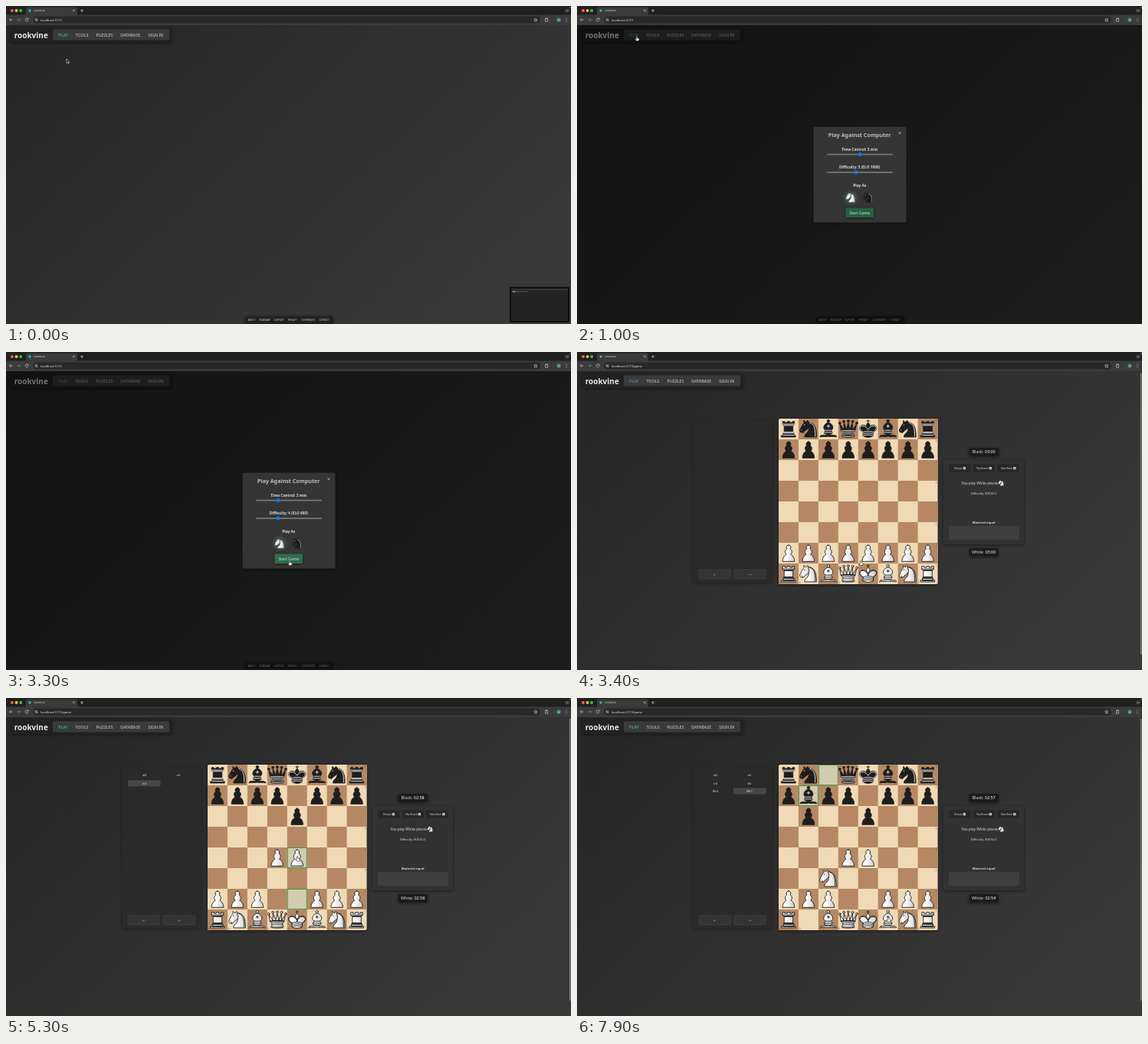
An HTML page that plays this animation: 737 by 415 pixels, repeating every 8 s.

```html
<!DOCTYPE html>
<html lang="en">
<head>
<meta charset="utf-8">
<title>rookvine</title>
<style>
  html, body { margin: 0; width: 100%; height: 100%; overflow: hidden; background: #222; }
  svg { display: block; width: 737px; height: 415px; }
  text { font-family: "Noto Sans", sans-serif; }
  .w { fill: url(#ivory); stroke: #222; --line: #222; }
  .b { fill: #1e1e1e; stroke: #1e1e1e; --line: #e8e8e8; }
  .w, .b { stroke-width: 1.4; stroke-linejoin: round; stroke-linecap: round; }
  .line { fill: none; stroke: var(--line); }
  .icon { fill: none; stroke: #c8c8c8; stroke-width: .7; }
</style>
</head>
<body>
<svg viewBox="0 0 737 415">
  <defs>
    <linearGradient id="page" x2="1" y2=".6"><stop stop-color="#252525"/><stop offset="1" stop-color="#383838"/></linearGradient>
    <linearGradient id="ivory"><stop offset=".3" stop-color="#fff"/><stop offset="1" stop-color="#ccc"/></linearGradient>
    <filter id="shadow" x="-20%" y="-20%" width="140%" height="140%"><feDropShadow dx="0" dy="1" stdDeviation="2" flood-opacity=".5"/></filter>
    <radialGradient id="glow"><stop stop-color="#3a9a62" stop-opacity=".7"/><stop offset="1" stop-color="#3a9a62" stop-opacity="0"/></radialGradient>
    <g id="p"><path d="M22.5 8c-2.5 0-4.3 2-4.3 4.4 0 1.1.4 2 1.1 3C17.3 16.5 16 18.6 16 21c0 2 .9 3.8 2.4 5-3 1.1-7.4 5.6-7.4 13.5h23c0-7.9-4.4-12.4-7.4-13.5 1.5-1.2 2.4-3 2.4-5 0-2.4-1.3-4.5-3.3-5.6.7-1 1.1-1.9 1.1-3 0-2.4-1.8-4.4-4.3-4.4z"/></g>
    <g id="r"><path d="M9 39h27v-3H9zM12 36v-4h21v4zM12.5 32l1.5-2.5h17l1.5 2.5zM14 29.5V17h17v12.5zM11 14V9h4v2h5V9h5v2h5V9h4v5l-3 3H14z"/><path class="line" d="M12 35.5h21M13 31.5h19M14 29.5h17M14 16.5h17M11 14h23"/></g>
    <g id="n"><path d="M22 10c10.5 1 16.5 8 16 29H15c0-9 10-6.5 8-21z"/><path d="M24 18c.4 3-5.5 7.4-8 9-3 2-2.8 4.3-5 4-1-1 1.4-3 0-3-1 0 .2 1.200-1 2-1 0-4 1-4-4 0-2 6-12 6-12s1.900-1.900 2-3.500c-.7-1-.5-2-.5-3 1-1 3 2.500 3 2.500h2s.8-2 2.500-3c1 0 1 3 1 3z"/><path class="line" d="M9 25.500v.1M15 15l-.6 1.200M25 11.500c8 2 11 9 10.500 26"/></g>
    <g id="b"><path d="M9 36c3.400-1 10.100.4 13.500-2 3.400 2.400 10.100 1 13.500 2 0 0 1.600.5 3 2-.7 1-1.600 1-3 .5-3.400-1-10.100.5-13.500-1-3.400 1.500-10.100 0-13.500 1-1.400.5-2.300.5-3-.5 1.400-1.900 3-2 3-2zM15 32c2.500 2.500 12.500 2.500 15 0 .5-1.500 0-2 0-2 0-2.500-2.500-4-2.500-4 5.500-1.500 6-11.500-5-15.500-11 4-10.500 14-5 15.500 0 0-2.500 1.500-2.500 4 0 0-.5.5 0 2z"/><circle cx="22.500" cy="8" r="2.500"/><path class="line" d="M17.500 26h10M15 30h15M22.500 15.500v5M20 18h5"/></g>
    <g id="q"><path d="M9 26c8.500-1.500 21-1.500 27 0l2.500-12.500L31 25l-.3-14-5.200 13.500-3-14.500-3 14.500L14.300 11 14 25 6.500 13.500zM9 26c0 2 1.500 2 2.500 4 1 1.500 1 1 .5 3.500-1.500 1-1 2.500-1 2.500-1.500 1.500 0 2.500 0 2.500 6.500 1 16.500 1 23 0 0 0 1.500-1 0-2.500 0 0 .5-1.500-1-2.500-.5-2.500-.5-2 .5-3.500 1-2 2.500-2 2.500-4-8.500-1.500-18.500-1.500-27 0z"/><circle cx="6" cy="12" r="2"/><circle cx="14" cy="9" r="2"/><circle cx="22.500" cy="8" r="2"/><circle cx="31" cy="9" r="2"/><circle cx="39" cy="12" r="2"/><path class="line" d="M10 27c8-1 17-1 25 0M11.500 30c3.500-1 18.500-1 22 0M12 33.500c6-1 15-1 21 0M12 37c6 1 15 1 21 0"/></g>
    <g id="k"><path d="M22.500 11.600V6M20 8h5M22.500 25s4.500-7.500 3-10.500c0 0-1-2.500-3-2.500s-3 2.500-3 2.500c-1.500 3 3 10.500 3 10.500M12.500 37c5.500 3.500 14.500 3.500 20 0v-7s9-4.500 6-10.500c-4-6.500-13.500-3.500-16 4V27v-3.500c-2.500-7.500-12-10.500-16-4-3 6 6 10.500 6 10.500z"/><path class="line" d="M12.500 30c5.500-3 14.500-3 20 0m-20 3.500c5.500-3 14.500-3 20 0m-20 3.500c5.500-3 14.500-3 20 0M32 29.500s8-4 6-9.500c-4-5-12-2-15 4M13 29.500s-8-4-6-9.500c4-5 12-2 15 4"/></g>
  </defs>
  <g id="stage"></g>
</svg>
<script>
const LOOP = 8000, GAME_START = 3400, BRAND = 'rookvine';
const SQ_W = 25.94, SQ_H = 27, BOARD_X = 263, BOARD_Y = 87;

// Cursor path: time, x, y
const PATH = [
  [0, 79, 69], [300, 79, 69], [700, 78, 39.5], [1200, 78, 39.5], [1700, 369, 193], [1900, 369, 193],
  [2000, 355, 193], [2200, 364, 216], [2300, 364, 216], [2400, 355, 216], [2800, 370, 272.5], [3400, 370, 272.5],
  [3700, 354, 263], [3800, 354, 263], [4200, 354, 209], [4600, 356, 212], [4900, 380, 263], [5000, 380, 263],
  [5200, 380, 207], [5600, 380, 207], [6200, 302, 290], [6300, 302, 290], [6800, 326, 242], [6900, 328, 236],
  [7000, 328, 236], [7500, 402, 281], [7700, 402, 281], [7900, 406, 286]
];
// Each move: time, from, to, notation, then grab time and legal targets when dragged
const MOVES = [
  [4200, 'd2', 'd4', 'd4', 3800, ['d3', 'd4']], [4900, 'e7', 'e6', 'e6'],
  [5300, 'e2', 'e4', 'e4', 5000, ['e3', 'e4']], [5600, 'b7', 'b6', 'b6'],
  [7000, 'b1', 'c3', 'Nc3', 6300, ['a3', 'c3', 'd2']], [7500, 'c8', 'b7', 'Bb7']
];

const rect = (x, y, w, h, fill, extra = '') => `<rect x="${x}" y="${y}" width="${w}" height="${h}" fill="${fill}" ${extra}/>`;
const circle = (x, y, r, fill) => `<circle cx="${x}" cy="${y}" r="${r}" fill="${fill}"/>`;
const text = (s, x, y, size, fill = '#ddd', extra = 'text-anchor="middle"') =>
  `<text x="${x}" y="${y}" font-size="${size}" fill="${fill}" ${extra}>${s}</text>`;
const left = (s, x, y, size, fill) => text(s, x, y, size, fill, '');
const bold = (s, x, y, size, fill) => text(s, x, y, size, fill, 'text-anchor="middle" font-weight="700"');
const icon = d => `<path class="icon" d="${d}"/>`;
const SHADOW = 'rx="2" filter="url(#shadow)"';

const piece = (type, side, x, y, scale = .675, opacity = 1) =>
  `<use href="#${type}" class="${side}" opacity="${opacity}" transform="translate(${x} ${y}) scale(${scale}) translate(-22.5 -23.5)"/>`;
const corner = sq => [BOARD_X + (sq.charCodeAt(0) - 97) * SQ_W, BOARD_Y + (8 - sq[1]) * SQ_H];
const centre = sq => { const [x, y] = corner(sq); return [x + SQ_W / 2, y + SQ_H / 2]; };

function cursorAt(t) {
  const i = PATH.findIndex(k => k[0] > t);
  if (i < 0) return PATH.at(-1).slice(1);
  const [t0, x0, y0] = PATH[i - 1], [t1, x1, y1] = PATH[i];
  const u = (t - t0) / (t1 - t0), e = u * u * (3 - 2 * u);
  return [x0 + (x1 - x0) * e, y0 + (y1 - y0) * e];
}

function cursor(t) {
  const [x, y] = cursorAt(t);
  const arrow = t < 600 || (t > 1200 && t < 1700);
  const look = arrow
    ? 'fill="#111" stroke="#fff" d="M0 0v5.500l1.300-1.100.9 2 .9-.4-.9-2h1.700z"'
    : 'fill="#fff" stroke="#111" d="M-.7 0q.7-.8 1.400 0v2.200l1.800.5q.8.300.6 1.100l-.5 2.100h-3.300l-1.600-2.100q.4-.9 1.600.2z"';
  return `<path stroke-width=".5" transform="translate(${x} ${y})" ${look}/>`;
}

function browser(url) {
  const lights = ['#ff5f57', '#febc2e', '#28c840'].map((c, i) => circle(8 + i * 5.6, 6, 2, c)).join('');
  return rect(0, 0, 737, 13, '#1f2020') + lights +
    rect(26, 1.5, 67, 13, '#3b3b3b', 'rx="2.5"') + rect(0, 11.5, 737, 13.5, '#3b3b3b') +
    rect(35, 13.5, 662, 9, '#282828', 'rx="4.500"') +
    circle(31, 6, 1.7, '#22b8b0') + left(BRAND, 36, 7.4, 3.6, '#ddd') +
    icon('M87.200 4.700l2.400 2.400m0-2.400l-2.400 2.400M97 6h4M99 4v4') +
    icon('M8.500 18h-4m1.800-1.800l-1.800 1.800 1.800 1.800M29 17a2 2 0 1 0 .1 1.500M29.200 15.800v1.400h-1.400') +
    `<g opacity=".5">${icon('M14.500 18h4m-1.800-1.800l1.800 1.800-1.800 1.800')}</g>` +
    icon('M37.500 17h4M37.500 19h4M38.500 16.200v1.600M40.500 18.200v1.600') +
    left(url, 45, 19.5, 4.1, '#e4e4e4') +
    icon('M690.800 15.800l.7 1.500 1.600.2-1.200 1.100.3 1.600-1.400-.8-1.400.8.300-1.600-1.200-1.100 1.600-.2z') +
    icon('M703.500 16.500h3.200v3.600h-3.200zM704.500 16.500v-.8h1.200v.8') +
    circle(721, 18, 2.7, '#3d7f98') + circle(721, 18.600, 1.3, '#7fae72') +
    [16, 18, 20].map(y => circle(731, y, .5, '#ccc')).join('') +
    rect(729, 3.5, 6, 5, '#3a3a3a', 'rx="1.500"') + icon('M730.800 5.400l1.200 1.200 1.200-1.200') + circle(736, 2, 1, '#4e5ea8');
}

function header(t) {
  const hue = 175 - 22 * Math.cos((t - 1000) / 6000 * 2 * Math.PI);
  const nav = [['TOOLS', 99], ['PUZZLES', 128.500], ['DATABASE', 162.300], ['SIGN IN', 195.300]];
  return rect(7, 28, 209.500, 19, '#242424', SHADOW) + rect(61, 30.5, 152, 14, '#3a3a3a', 'rx="1.500"') +
    text(BRAND, 10.700, 41.600, 10, '#e8e8e8', 'font-weight="700"') +
    text('PLAY', 74.500, 39.700, 5.400, `hsl(${hue} 62% 52%)`) +
    nav.map(([s, x]) => text(s, x, 39.700, 5.400, '#d4d4d4')).join('');
}

function footer() {
  const links = [['ABOUT', 320.500], ['ROADMAP', 337.500], ['SUPPORT', 356], ['PRIVACY', 373.500], ['CONTRIBUTE', 394.300], ['CONTACT', 415]];
  return rect(312, 404.500, 115, 12, '#242424', SHADOW) + links.map(([s, x]) => text(s, x, 410.800, 2.900, '#ccc')).join('');
}

function thumbnail(t) {
  const x = Math.max(0, t - 200) / 300 * 80;
  return x > 80 ? '' : `<g transform="translate(${x})">` + rect(658, 367.500, 76, 44.500, '#242424', 'stroke="#050505" stroke-width="1.500"') +
    rect(659.500, 369.500, 73, 1, '#444') + rect(660.500, 372, 20, 1.400, '#484848') + rect(660.500, 372, 4, 1.200, '#aaa') + '</g>';
}

function slider(label, y, thumb) {
  return bold(label, 368.700, y, 4.800) + rect(326, y + 4, 86, 1.700, '#777', 'rx=".8"') + circle(thumb, y + 4.900, 2.500, '#0b76f0');
}

function modal(t) {
  const quick = t >= 2000, easy = t >= 2400;
  return rect(0, 25, 737, 390, '#000', 'opacity=".5"') + rect(308.500, 157.500, 121, 125, '#353535', SHADOW) +
    bold('Play Against Computer', 368.700, 171.300, 7.150, '#bdbdbd') + icon('M419.400 164.200l3.200 3.200m0-3.200l-3.200 3.200') +
    slider(`Time Control: ${quick ? 3 : 5} min`, 188.700, quick ? 355 : 369) +
    slider(`Difficulty: ${easy ? '4 (ELO 800)' : '5 (ELO 1000)'}`, 212.200, easy ? 355 : 364) +
    bold('Play As', 368.700, 235.700, 4.800) +
    '<circle cx="357" cy="250" r="11" fill="url(#glow)"/>' + piece('n', 'w', 357, 250, .4) + piece('n', 'b', 379.500, 250, .4) +
    rect(350.500, 263.500, 36.500, 12.500, t >= 2700 ? '#2f6d4b' : '#25603f', SHADOW) + text('Start Game', 368.700, 271.700, 5.100);
}

function startPosition() {
  const pieces = {};
  [...'rnbqkbnr'].forEach((type, i) => {
    const file = 'abcdefgh'[i];
    Object.assign(pieces, { [file + 1]: [type, 'w'], [file + 2]: ['p', 'w'], [file + 7]: ['p', 'b'], [file + 8]: [type, 'b'] });
  });
  return pieces;
}

function board(t, played) {
  const pieces = startPosition();
  for (const [, from, to] of played) { pieces[to] = pieces[from]; delete pieces[from]; }
  const drag = MOVES.find(m => m[4] <= t && t < m[0]);
  let out = rect(BOARD_X, BOARD_Y, 207.500, 216, '#f0d9b5', SHADOW);
  for (let i = 0; i < 64; i++) {
    const file = i % 8, row = i >> 3;
    if ((file + row) % 2) out += rect(BOARD_X + file * SQ_W, BOARD_Y + row * SQ_H, SQ_W, SQ_H, '#b58863');
  }
  for (let i = 0; i < 8; i++)
    out += text(8 - i, 468.500, 91 + i * SQ_H, 2.800, '#6b5038') + text('abcdefgh'[i], 264.600 + i * SQ_W, 301.900, 2.800, '#6b5038');
  if (played.length) for (const sq of played.at(-1).slice(1, 3)) {
    const [x, y] = corner(sq);
    out += rect(x + .5, y + .5, SQ_W - 1, SQ_H - 1, 'rgba(150,175,160,.33)', 'stroke="#409c45"');
  }
  if (drag) out += rect(...corner(drag[1]), SQ_W, SQ_H, 'rgba(0,70,10,.85)') +
    drag[5].map(sq => circle(...centre(sq), 3.200, 'rgba(50,110,35,.75)')).join('');
  for (const [sq, [type, side]] of Object.entries(pieces))
    out += piece(type, side, ...centre(sq), .675, drag && sq === drag[1] ? .5 : 1);
  return drag ? out + piece(...pieces[drag[1]], ...cursorAt(t)) : out;
}

function moveList(played) {
  let out = rect(152.500, 90, 101.500, 210, '#292929', SHADOW + ' stroke="#343434" stroke-width=".6"');
  played.forEach((m, i) => {
    const black = i % 2, y = 101 + (i >> 1) * 10.200;
    if (i === played.length - 1) out += rect(black ? 204 : 159, y - 4, 42.500, 8, '#474747', 'rx="1"');
    out += text(m[3], black ? 225 : 180.500, y + 1.400, 4.200);
  });
  for (const [x, s] of [[159, '←'], [205, '→']])
    out += rect(x, 284, 41.500, 12, '#343434', 'rx="1" stroke="#444" stroke-width=".6"') + text(s, x + 20.800, 292, 6);
  return out;
}

// One second passes per 500 ms; the side to move pays for each tick.
function clocks(t) {
  const left = { White: 180, Black: 180 };
  for (let tick = 3800; tick <= t; tick += 500)
    left[MOVES.filter(m => m[0] < tick).length % 2 ? 'Black' : 'White']--;
  const show = (side, y) => {
    const s = left[side], time = `0${s / 60 | 0}:${String(s % 60).padStart(2, 0)}`;
    return rect(511.500, y, 38.500, 11, '#1b1b1b', SHADOW) +
      text(`${side}: <tspan fill="#fff" font-weight="500">${time}</tspan>`, 530.600, y + 7.300, 5.400);
  };
  return show('Black', 125) + show('White', 256);
}

function sidePanel(t) {
  const buttons = [['Resign', 485], ['Flip Board', 516.500], ['Take Back', 548]];
  return rect(478, 141, 105, 110, '#323232', SHADOW) + clocks(t) +
    buttons.map(([s, x]) => rect(x, 146.500, 28.500, 10.500, '#272727', 'rx="1"') + text(s, x + 12.300, 152.900, 3.250) +
      rect(x + (s === 'Resign' ? 18.700 : 21.200), 150, 3.300, 3.300, '#ddd', 'rx=".4"') +
      rect(x + (s === 'Resign' ? 19.600 : 22.100), 150.900, 1.500, 1.500, '#777')).join('') +
    text('You play White pieces', 525.300, 172.500, 4.700) + piece('n', 'w', 553.300, 171, .23) +
    text('Difficulty: 800 ELO', 530.600, 186.200, 3.950) + bold('Material equal', 530.600, 223.700, 4.100) +
    rect(485, 227, 92, 18, '#3f3f3f', 'rx="1.500"');
}

function game(t) {
  const played = MOVES.filter(m => m[0] <= t);
  return moveList(played) + sidePanel(t) + board(t, played) + rect(735, 27, 1.500, 368, '#858585', 'rx=".7"');
}

function scene(t) {
  const playing = t >= GAME_START;
  return rect(0, 0, 737, 415, 'url(#page)') + header(t) +
    (playing ? game(t) : footer() + (t >= 1000 ? modal(t) : thumbnail(t))) +
    browser('localhost:5173' + (playing ? '/game' : '')) + cursor(t);
}

const stage = document.getElementById('stage');
let shown = -1;
function tick() {
  const t = Math.floor(performance.now() % LOOP / 100) * 100;
  if (t !== shown) stage.innerHTML = scene(shown = t);
  requestAnimationFrame(tick);
}
tick();
</script>
</body>
</html>
```
